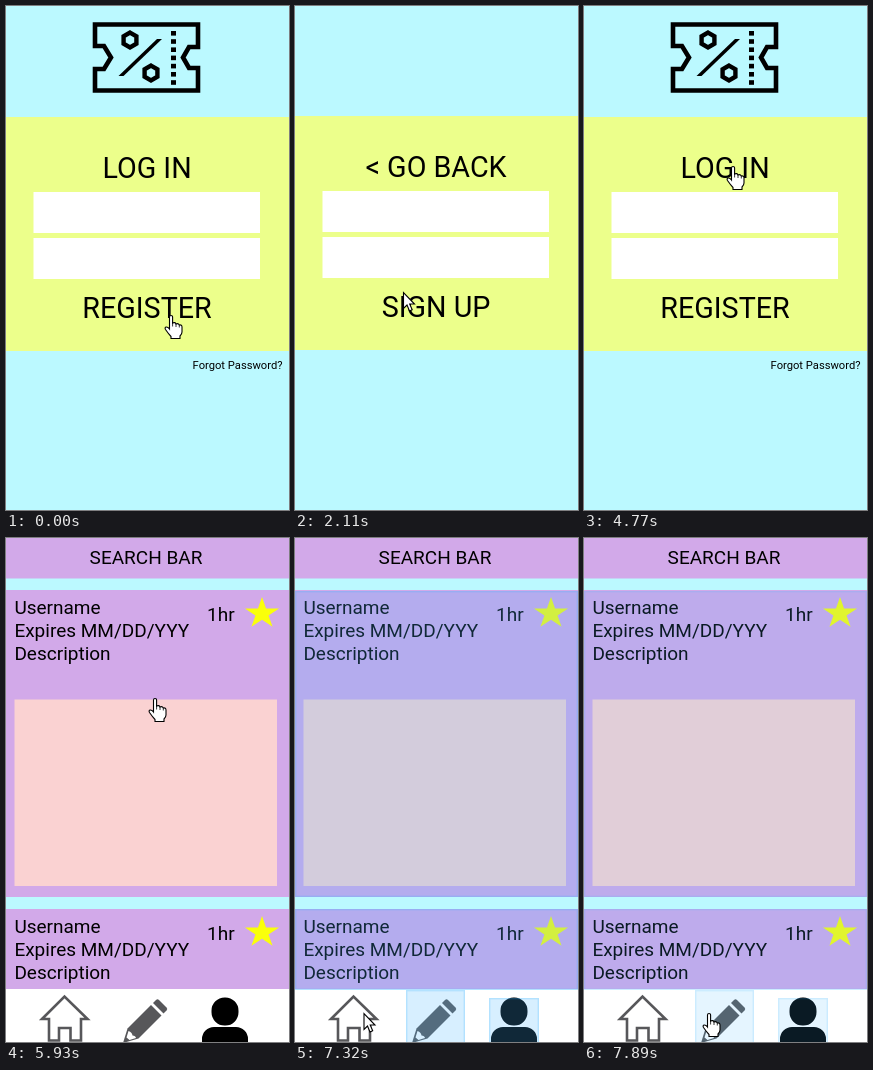
An HTML page with a canvas for the animation above (8000 ms loop, 283 by 504 pixels).

```html
<!DOCTYPE html>
<html lang="en">
<head>
<meta charset="utf-8">
<title>Coupon app prototype</title>
<style>
html, body { margin: 0; width: 283px; height: 504px; overflow: hidden; background: #bbf9ff; }
canvas { display: block; }
</style>
</head>
<body>
<canvas id="stage" width="283" height="504"></canvas>
<script>
const ctx = document.getElementById('stage').getContext('2d');
const LOOP = 8000;
const CYAN = '#bbf9ff', YELLOW = '#ecff8b', LILAC = '#d2a9e9', PINK = '#fad2d2', GREY = '#57575a';

// Pointer: [ms, x, y, kind], held until the next entry
const pointer = [
  [0, 165, 309, 'hand'], [150, 152, 309, 'hand'], [420, 148, 309, 'hand'], [1180, 148, 304, 'hand'],
  [1450, 168, 285, 'arrow'], [1580, 212, 215, 'arrow'], [1710, 175, 150, 'hand'], [1850, 85, 166, 'hand'],
  [1980, 62, 235, 'arrow'], [2110, 108, 286, 'arrow'], [2260, 190, 262, 'arrow'], [2410, 212, 201, 'arrow'],
  [2560, 198, 172, 'hand'], [2700, 174, 160, 'hand'], [2830, 154, 159, 'hand'], [2970, 144, 160, 'hand'],
  [3100, 142, 161, 'hand'],
  [3530, 146, 190, 'arrow'], [3680, 151, 255, 'arrow'], [3820, 152, 296, 'hand'], [3970, 152, 275, 'arrow'],
  [4110, 150, 200, 'arrow'], [4260, 149, 160, 'hand'],
  [6230, 136, 220, 'arrow'], [6400, 108, 330, 'arrow'], [6560, 80, 440, 'arrow'], [6800, 68.5, 475, 'arrow'],
  [7460, 78, 475, 'arrow'], [7600, 98, 475, 'arrow'], [7750, 118, 475, 'hand'], [7890, 125, 475, 'hand']
];

// Hotspot hint opacity: [ms, alpha]
const hint = [[6780, 0], [6930, 0.51], [7050, 0.45], [7320, 0.22], [7890, 0.14], [8000, 0.13]];

function hintAlpha(t) {
  const i = hint.findIndex(k => k[0] > t);
  if (i < 1) return 0;
  const [t0, a] = hint[i - 1], [t1, b] = hint[i];
  return a + (b - a) * (t - t0) / (t1 - t0);
}

function box(x, y, w, h, color) {
  ctx.fillStyle = color;
  ctx.fillRect(x, y, w, h);
}

function label(text, x, y, size, align = 'left') {
  ctx.font = size + 'px Roboto, sans-serif';
  ctx.textAlign = align;
  ctx.fillStyle = '#000';
  ctx.fillText(text, x, y);
}

function shape(d, fill, stroke, width = 1, x = 0, y = 0) {
  const p = new Path2D(d);
  ctx.save();
  ctx.translate(x, y);
  if (fill) { ctx.fillStyle = fill; ctx.fill(p); }
  if (stroke) { ctx.strokeStyle = stroke; ctx.lineWidth = width; ctx.stroke(p); }
  ctx.restore();
}

function polygon(cx, cy, n, radius, squash = 1) {
  let d = '';
  for (let i = 0; i < n; i++) {
    const a = i * 2 * Math.PI / n - Math.PI / 2, r = radius(i);
    d += (i ? 'L' : 'M') + (cx + r * Math.cos(a)) + ' ' + (cy + r * squash * Math.sin(a));
  }
  return d + 'Z';
}

function ticket() {
  shape('M89 18.5H192V41H183L177 51.5L183 62H192V84.5H89V63H98L105 51.5L98 40H89Z', null, '#000', 4.6);
  shape('M112.5 70L117.5 70L156 33L151 33Z', '#000');
  for (const [x, y] of [[124, 34], [145, 67]]) shape(polygon(x, y, 6, () => 7.4), null, '#000', 4.4);
  for (let y = 25; y < 78; y += 8.2) box(165, y, 5, 4.6, '#000');
}

function form(top, title, action) {
  box(0, 0, 283, 504, CYAN);
  box(0, top, 283, 234, YELLOW);
  box(27.5, top + 75, 226.5, 41, '#fff');
  box(27.5, top + 121, 226.5, 41, '#fff');
  label(title, 141, top + 61, 28.7, 'center');
  label(action, 141, top + 201, 28.7, 'center');
}

function login() {
  form(111, 'LOG IN', 'REGISTER');
  ticket();
  label('Forgot Password?', 276.5, 363, 11.2, 'right');
}

function signup() {
  form(110, '< GO BACK', 'SIGN UP');
}

function post(y) {
  box(0, y, 283, 307, LILAC);
  label('Username', 8.4, y + 24, 19);
  label('Expires MM/DD/YYY', 8.4, y + 47, 19);
  label('Description', 8.4, y + 70, 19);
  label('1hr', 201, y + 31, 19);
  shape(polygon(256, y + 23.5, 10, i => i % 2 ? 6.9 : 18, 0.91), '#faff0a');
  box(8.5, y + 109.5, 262.5, 186.5, PINK);
}

function nav() {
  box(0, 451, 283, 53, '#fff');
  shape('M36 481L58.5 458.5L81.5 481H75V502.5H64.5V490H53V502.5H43V481Z', null, GREY, 2.6);
  // pencil: eraser, body with point, bare wood
  shape('M147 465L150 462Q151.500 460.500 153 462L160.500 469.500Q162 471 160.500 472.500L157.500 475.500Z', GREY);
  shape('M145 467L155.500 477.500L132.500 500.500L117 505L121.500 490.500Z', GREY);
  shape('M122.500 493L120.500 499.500L123.500 502L130 500Q129.500 497.500 126.500 497.500Q126 494 122.500 493Z', '#fff');
  ctx.fillStyle = '#000';
  ctx.beginPath();
  ctx.roundRect(205.5, 459.5, 27, 28, 13.2);
  ctx.roundRect(196, 489, 46, 30, 12);
  ctx.fill();
}

function feed(t) {
  box(0, 0, 283, 504, CYAN);
  post(52);
  post(371);
  box(0, 0, 283, 40.5, LILAC);
  label('SEARCH BAR', 140, 26, 19, 'center');
  nav();
  const alpha = hintAlpha(t);
  if (!alpha) return;
  const spots = [[0, 53, 283, 306], [0, 371, 283, 81], [111, 452, 59, 60], [194, 460, 50, 50]];
  ctx.globalAlpha = alpha;
  ctx.strokeStyle = '#35b2ff';
  ctx.lineWidth = 1.4;
  for (const [x, y, w, h] of spots) {
    box(x, y, w, h, '#4bb8ff');
    ctx.strokeRect(x + 0.7, y + 0.7, w - 1.4, h - 1.4);
  }
  ctx.globalAlpha = 1;
}

const cursors = {
  hand: 'M-1.5 2Q-1.500 .5 0 .5Q1.600 .5 1.600 2V8Q4 6.800 5 9Q7.300 8 8.300 10Q11 9.500 11 12V17Q11 19 9 21V23.500H0V21.500Q-2 19.500 -5.500 14.500Q-6.500 12.500 -5 12Q-3 11.800 -1.500 14Z',
  arrow: 'M.5 .5V16.500L4 13L6.500 19L9.200 17.800L6.700 12H11.500Z'
};

function drawPointer(t) {
  const [, x, y, kind] = pointer.findLast(k => k[0] <= t);
  shape(cursors[kind], '#fff', '#000', 1.1, x, y);
  if (kind === 'hand') shape('M1.600 8V11.500M5 9V12M8.300 10V12.500', null, '#000', 0.8, x, y);
}

function frame(now) {
  const t = now % LOOP;
  if (t >= 5930) feed(t);
  else if (t >= 1180 && t < 4770) signup();
  else login();
  drawPointer(t);
  requestAnimationFrame(frame);
}
requestAnimationFrame(frame);
</script>
</body>
</html>
```
